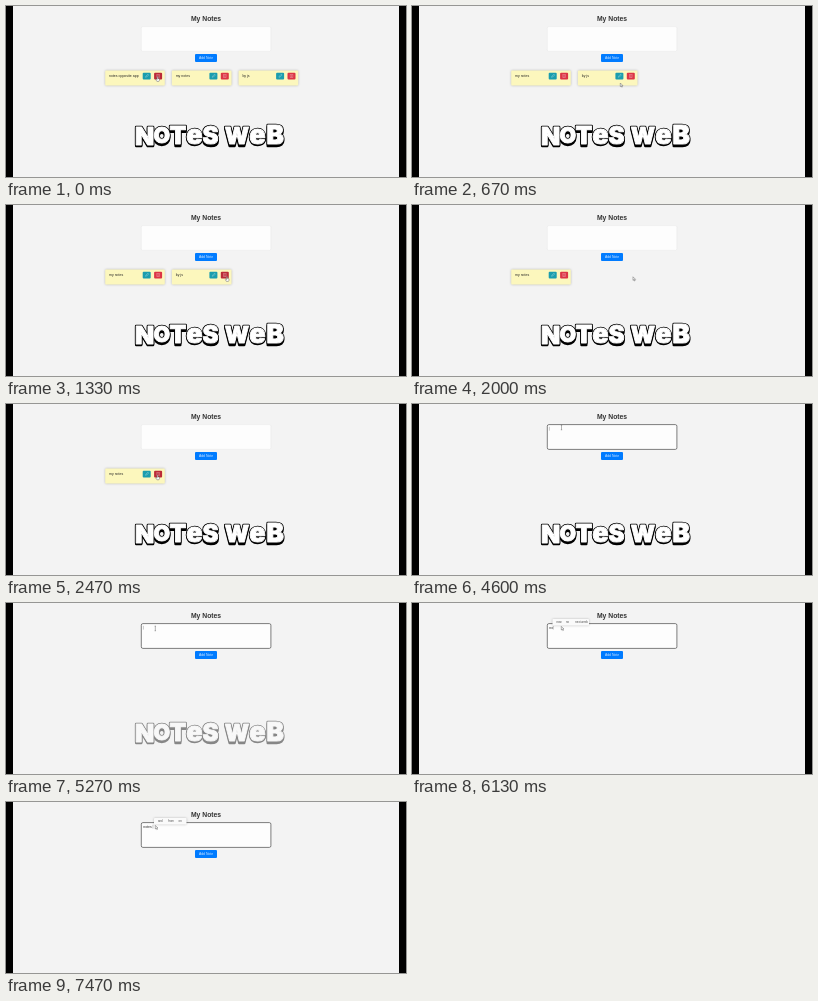
An HTML page for the animation above (8 s loop, 400x171 px).

```html
<!DOCTYPE html>
<html lang="en">
<head>
<meta charset="utf-8">
<title>My Notes</title>
<style>
  html, body { margin: 0; width: 100%; height: 100%; overflow: hidden; background: #000; }
  svg { display: block; width: 100vw; height: 100vh; }
  text { font: 3.5px "Liberation Sans", Arial, sans-serif; fill: #222; white-space: pre; }
  .title { font-size: 6.8px; font-weight: 700; text-anchor: middle; fill: #333; }
  .add { font-size: 3.4px; text-anchor: middle; fill: #fff; opacity: .85; }
  .word { font-size: 2.8px; fill: #444; }
  .card, .popup { filter: drop-shadow(0 .5px .9px rgba(0, 0, 0, .25)); }
  .icon { fill: none; stroke: #fff; stroke-width: .4; opacity: .65; }
  .caption text { font: 900 24px Inter, "Open Sans", sans-serif; fill: #000; stroke: #000; stroke-linejoin: round; }
  .caption .face { fill: #fff; stroke: #fff; stroke-width: .9; }
  .pointer path { fill: #fff; stroke: #555; stroke-width: .45; stroke-linejoin: round; }
</style>
</head>
<body>
<svg viewBox="0 0 400 171" preserveAspectRatio="none">
  <rect x="7" width="386" height="171" fill="#f3f3f3"/>
  <text class="title" x="200" y="14.8">My Notes</text>
  <rect id="field" x="135.3" y="20.6" width="129.6" height="24.8" rx="1.6" fill="#fdfdfd"/>
  <text id="typed" x="137.2" y="26"></text>
  <path id="caret" d="M137.4 22.8v3.8" stroke="#777" stroke-width=".4"/>
  <rect x="189" y="48" width="22" height="8" rx="1" fill="#007bff"/>
  <text class="add" x="200" y="53.2">Add Note</text>
  <g id="cards"></g>
  <g id="popup" class="popup">
    <rect id="panel" y="16" height="6.6" rx=".8" fill="#fafafa"/>
    <text class="word" y="20"></text>
    <text class="word" y="20"></text>
    <text class="word" y="20"></text>
  </g>
  <g id="caption" class="caption"></g>
  <g id="pointer" class="pointer">
    <path data-kind="arrow" d="M0 0V3.6L.9 2.8 1.5 4.2 2.1 3.9 1.5 2.6H2.6Z"/>
    <path data-kind="hand" d="M-.4 0Q0-.5.4 0V1.6L2 2V3.4L1.4 4.6H-.6L-1.8 2.6-1.3 2.2-.4 2.9Z"/>
    <path data-kind="beam" d="M-.7 0H.7M0 0V4.6M-.7 4.6H.7"/>
  </g>
</svg>
<script>
const TICK = 1000 / 15, TICKS = 120;
const $ = id => document.getElementById(id);

// Every table row starts with the tick at which it takes effect.
const NOTES = [
  [0, ["notes opposite app", "my notes", "by js"]],
  [1, ["my notes", "by js"]],
  [30, ["my notes"]],
  [46, []]
];
const TYPED = [[0, ""], [87, "n"], [89, "no"], [94, "not"], [96, "note"], [105, "notes"], [109, "notes "]];
const POPUPS = [
  [0, null],
  [88, [140.5, 36.5, "now", "no", "next week"]],
  [99, [142, 36, "note", "not", "noted"]],
  [106, [145, 36, "notes", "note", "noted"]],
  [109, [147, 34, "for", "and", "to"]],
  [112, [148, 32.5, "and", "from", "on"]]
];
const PATH = [
  [0, 151.5, 70.8], [2, 151.5, 70.8], [6, 190, 79.5], [10, 208.3, 77], [13, 214, 73.5],
  [20, 221, 71.8], [31, 221, 71.8], [37, 151.5, 71.2], [47, 151.5, 71.2],
  [52, 149.5, 21.2], [75, 149.5, 21.2], [80, 149.3, 23.4]
];

const rowAt = (rows, k) => rows.filter(r => r[0] <= k).pop();

function pointerAt(k) {
  const a = rowAt(PATH, k), b = PATH[PATH.indexOf(a) + 1];
  if (!b) return [a[1], a[2]];
  const u = (k - a[0]) / (b[0] - a[0]), e = u * u * (3 - 2 * u);
  return [a[1] + (b[1] - a[1]) * e, a[2] + (b[2] - a[2]) * e];
}

const cardX = i => 99.2 + i * 66.7;
const overDelete = (i, x, y) =>
  x > cardX(i) + 48.6 && x < cardX(i) + 57 && y > 66.5 && y < 73.6;

const card = (label, i, hot) => `
  <g transform="translate(${cardX(i)} 64.6)">
    <rect class="card" width="59.6" height="15" rx="1" fill="#fcf7bd"/>
    <text x="3.8" y="6.6">${label}</text>
    <rect x="37.5" y="2.2" width="8" height="6.6" rx="1" fill="#1b9dae"/>
    <path class="icon" d="M40.4 6.7l.3-1.1 2-2 .8.8-2 2Z"/>
    <rect x="48.9" y="2.2" width="8" height="6.6" rx="1" fill="${hot ? "#bb2a37" : "#dc3545"}"/>
    <path class="icon" d="M51.2 3.9h3.4M51.6 4.2v2.7h2.6V4.2M52.9 4.5v2"/>
  </g>`;

// Caption letters: character, x, font size, baseline.
const LETTERS = [
  ["N", 129, 25, 138.6], ["O", 147.4, 21.5, 137], ["T", 163.6, 24.5, 138],
  ["e", 180.2, 27, 137.6], ["S", 196.6, 24, 138], [" ", 213, 24, 138],
  ["W", 218.8, 22.5, 138], ["e", 243.2, 27, 137.6], ["B", 260.4, 26, 138.4]
];
const word = LETTERS.map(([c, x, size, y]) =>
  `<tspan x="${x}" y="${y}" font-size="${size}">${c}</tspan>`).join("");
const layer = (cls, attrs = "") => `<text class="${cls}" ${attrs}>${word}</text>`;
$("caption").innerHTML =
  layer("shade", 'stroke-width="2.4" transform="translate(0 1.6)"') +
  layer("edge", 'stroke-width="2.6"') + layer("face");

function draw(k) {
  const [x, y] = pointerAt(k);
  const notes = rowAt(NOTES, k)[1];
  const hot = notes.findIndex((_, i) => overDelete(i, x, y));
  $("cards").innerHTML = notes.map((n, i) => card(n, i, i === hot)).join("");

  const focused = k >= 52;
  $("field").setAttribute("stroke", focused ? "#555" : "#e2e2e2");
  $("field").setAttribute("stroke-width", focused ? .75 : .4);

  const typed = rowAt(TYPED, k)[1];
  $("typed").textContent = typed;
  const end = typed ? $("typed").getComputedTextLength() : 0;
  $("caret").setAttribute("transform", `translate(${end} 0)`);
  $("caret").style.display = focused ? "" : "none";

  const popup = rowAt(POPUPS, k)[1];
  $("popup").style.display = popup ? "" : "none";
  if (popup) {
    const [left, width, ...words] = popup;
    $("panel").setAttribute("x", left);
    $("panel").setAttribute("width", width);
    document.querySelectorAll(".word").forEach((w, i) => {
      w.setAttribute("x", left + 4 + i * (width > 33 ? 9.4 : 10.3));
      w.textContent = words[i];
    });
  }

  $("caption").style.opacity = Math.max(0, Math.min(1, (83 - k) / 9));

  const kind = hot >= 0 ? "hand" : k >= 52 && k < 80 ? "beam" : "arrow";
  $("pointer").setAttribute("transform", `translate(${x} ${y})`);
  for (const p of $("pointer").children) p.style.display = p.dataset.kind === kind ? "" : "none";
}

let last = -1;
const start = performance.now();
function loop() {
  const k = Math.floor((performance.now() - start) / TICK + .05) % TICKS;
  if (k !== last) draw(last = k);
  requestAnimationFrame(loop);
}
loop();
</script>
</body>
</html>
```
